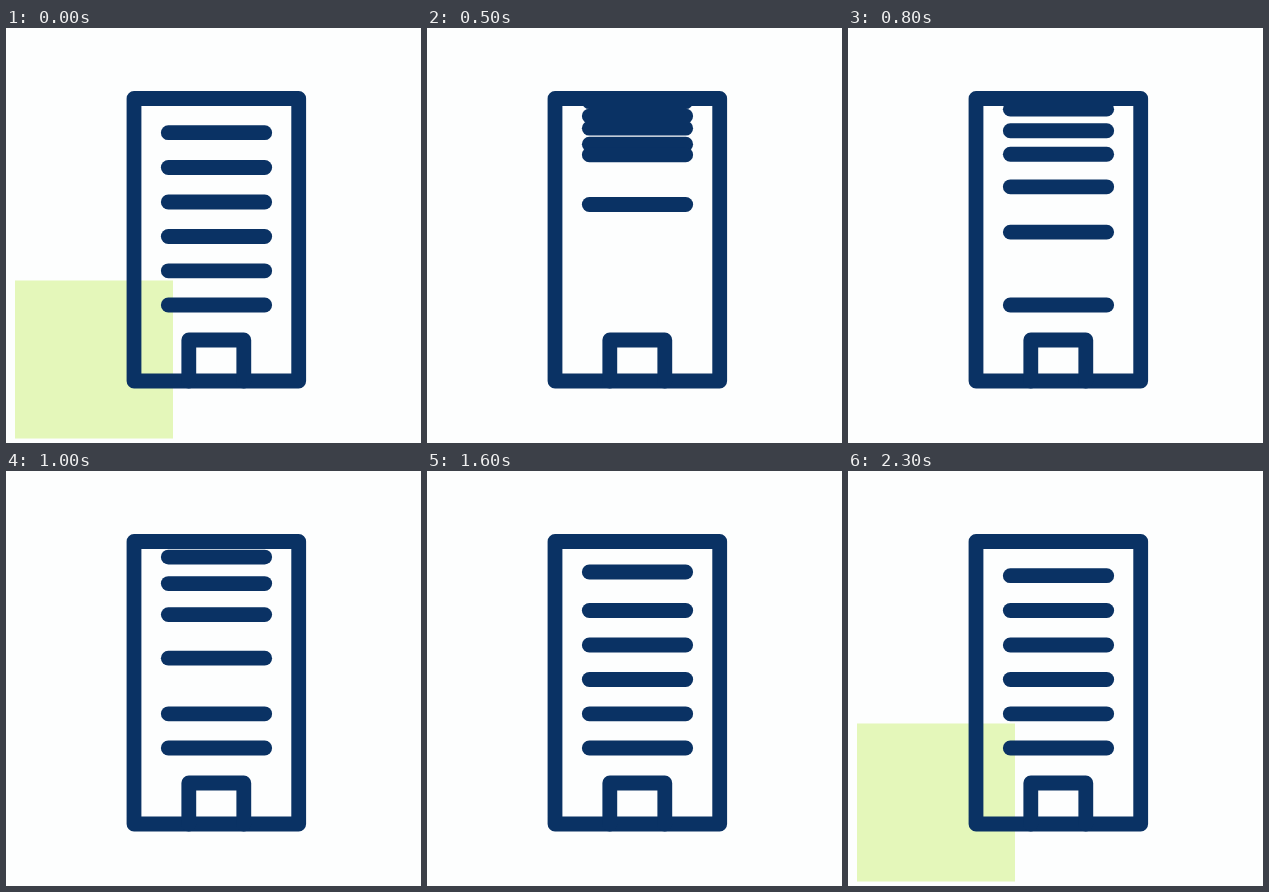
Write an HTML page that moves like this. It is 415 px wide and 415 px high and loops after 2500 ms.

```html
<!DOCTYPE html>
<html lang="en">
<head>
<meta charset="utf-8">
<title>Building</title>
<style>
  html, body { margin: 0; width: 100%; height: 100%; overflow: hidden; background: #fdfefe; }
  svg { display: block; width: 100%; height: 100%; }
  #lines { fill: none; stroke: #0a3264; stroke-width: 14.8; stroke-linejoin: round; stroke-linecap: round; }
</style>
</head>
<body>
<svg viewBox="0 0 415 415">
  <rect id="square" fill="#e4f7ba"/>
  <g id="lines">
    <path d="M128 70.5H292.7V353H128Z"/>
    <path d="M182.8 353V312H237.8V353"/>
  </g>
</svg>
<script>
  const LOOP = 2500, STEP = 100, START = 250, GROW = 1950, GROW_TIME = 300;
  const SIZE = 158, CX = 88, CY = 331.5;
  const square = document.getElementById('square');
  const lines = document.getElementById('lines');

  // Every floor starts near the roof and slides down to its place; lower floors arrive first.
  const floors = [
    [67.5, 104.7], [75.8, 139.5], [78.5, 174],
    [80.8, 208.5], [62.3, 242.8], [76, 277]
  ].map(([from, to], i) => {
    const bar = document.createElementNS('http://www.w3.org/2000/svg', 'path');
    lines.append(bar);
    return { bar, from, to, duration: 1500 - 200 * i };
  });

  const clamp = v => Math.min(1, Math.max(0, v));

  function draw(t) {
    const resting = t < START;
    for (const { bar, from, to, duration } of floors) {
      const p = resting ? 1 : clamp((t - START) / duration);
      bar.setAttribute('d', `M162.3 ${from + (to - from) * p}H258.7`);
    }
    const size = SIZE * (resting ? 1 : clamp((t - GROW) / GROW_TIME));
    square.setAttribute('x', CX - size / 2);
    square.setAttribute('y', CY - size / 2);
    square.setAttribute('width', size);
    square.setAttribute('height', size);
  }

  function tick() {
    const t = performance.now() % LOOP;
    draw(Math.floor(t / STEP) * STEP);
    requestAnimationFrame(tick);
  }
  tick();
</script>
</body>
</html>
```
